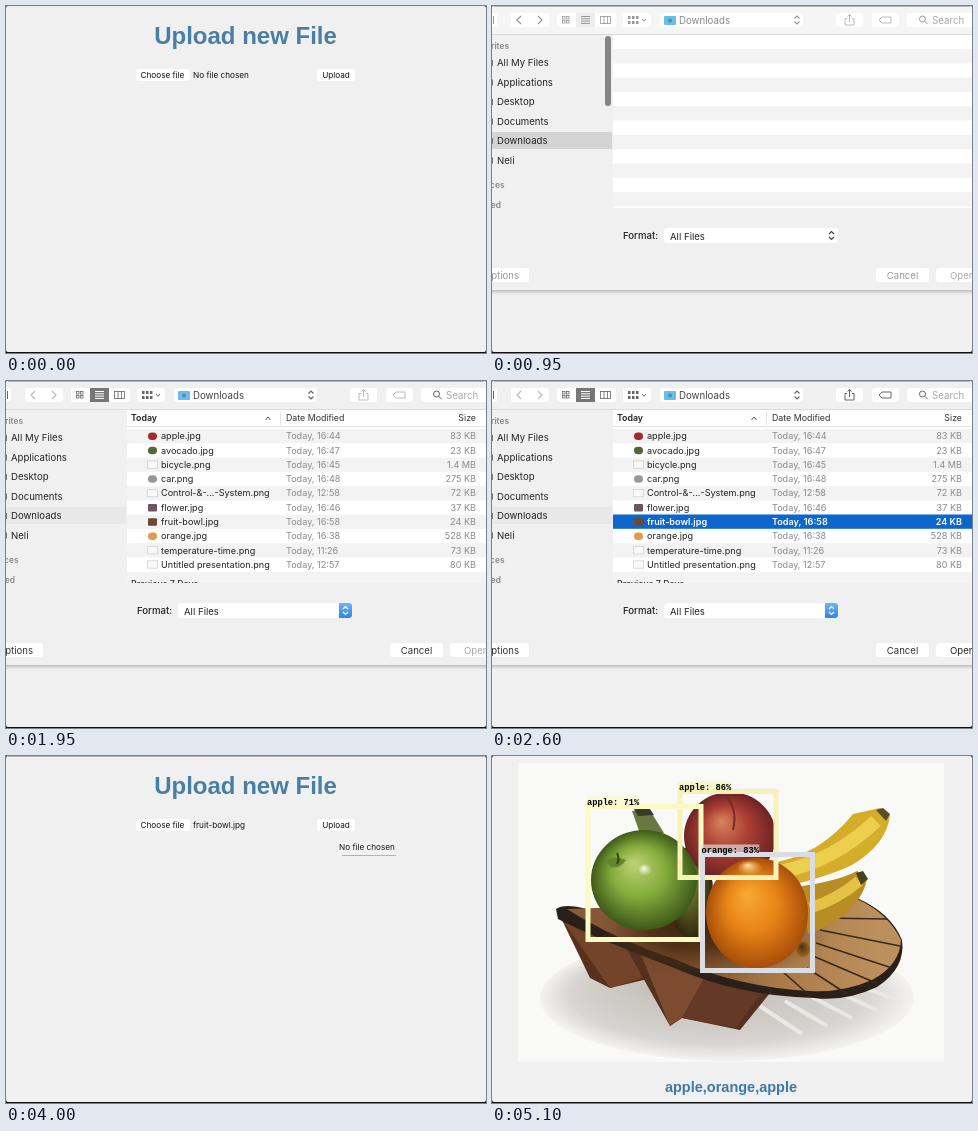
An HTML page with a canvas for the animation above (5.15 s loop, 480x347 px).

```html
<!DOCTYPE html>
<html lang="en">
<head>
<meta charset="utf-8">
<title>Upload new File</title>
<style>
html, body { margin: 0; width: 100%; height: 100%; overflow: hidden; background: #f0f0f0; }
canvas { display: block; width: 480px; height: 347px; }
</style>
</head>
<body>
<canvas id="stage" width="480" height="347"></canvas>
<script>
const LOOP = 5150;
const UI = 'Inter, sans-serif', ARIAL = '"Liberation Sans", Arial, sans-serif',
      MONO = '"Liberation Mono", monospace';
const c = document.getElementById('stage').getContext('2d');

const FILES = [
  ['apple.jpg', '16:44', '83 KB', '#a02a2e'],
  ['avocado.jpg', '16:47', '23 KB', '#55663a'],
  ['bicycle.png', '16:45', '1.4 MB', ''],
  ['car.png', '16:48', '275 KB', '#999'],
  ['Control-&-...-System.png', '12:58', '72 KB', ''],
  ['flower.jpg', '16:46', '37 KB', '#6b5560'],
  ['fruit-bowl.jpg', '16:58', '24 KB', '#6a4a35'],
  ['orange.jpg', '16:38', '528 KB', '#e39a4a'],
  ['temperature-time.png', '11:26', '73 KB', ''],
  ['Untitled presentation.png', '12:57', '80 KB', '']
];
const PLACES = ['All My Files', 'Applications', 'Desktop', 'Documents', 'Downloads', 'Neli'];

function rect(x, y, w, h, fill) {
  c.fillStyle = fill;
  c.fillRect(x, y, w, h);
}

function box(x, y, w, h, fill = '#fff', r = 2.5) {
  c.fillStyle = fill;
  c.beginPath();
  c.roundRect(x, y, w, h, r);
  c.fill();
}

// y is the vertical middle of the capitals
function text(s, x, y, size, color = '#222', { weight = 400, align = 'left', font = UI } = {}) {
  c.font = `${weight} ${size}px ${font}`;
  c.textAlign = align;
  c.fillStyle = color;
  c.fillText(s, x, y + size * 0.36);
}

function line(points, color, width = 1) {
  c.strokeStyle = color;
  c.lineWidth = width;
  c.beginPath();
  for (let i = 0; i < points.length; i += 2) c.lineTo(points[i], points[i + 1]);
  c.stroke();
}

function shape(d, fill, stroke, width = 1) {
  const p = new Path2D(d);
  if (fill) { c.fillStyle = fill; c.fill(p); }
  if (stroke) { c.strokeStyle = stroke; c.lineWidth = width; c.stroke(p); }
}

function updown(x, y, color) {
  line([x - 2.5, y - 1.5, x, y - 4, x + 2.5, y - 1.5], color, 1.2);
  line([x - 2.5, y + 1.5, x, y + 4, x + 2.5, y + 1.5], color, 1.2);
}

function gradient(g, ...colors) {
  colors.forEach((color, i) => g.addColorStop(i / (colors.length - 1), color));
  return g;
}

function ball(x, y, rx, ry, ...colors) {
  c.save();
  c.translate(x, y);
  c.scale(rx, ry);
  c.fillStyle = gradient(c.createRadialGradient(-0.2, -0.35, 0, 0, 0, 1), ...colors);
  c.beginPath();
  c.arc(0, 0, 1, 0, 7);
  c.fill();
  c.restore();
}

function drawForm(t) {
  text('Upload new File', 239.5, 29.5, 24, '#4a7fa5', { weight: 700, align: 'center', font: ARIAL });
  box(130, 63, 54, 12);
  text('Choose file', 134.5, 69.3, 8.2, '#111');
  text(t < 3000 ? 'No file chosen' : 'fruit-bowl.jpg', 187, 69.3, 8.2, '#111');
  box(311, 63, 38, 12);
  text('Upload', 330, 69.3, 8.2, '#111', { align: 'center' });
  if (t >= 4000) {
    rect(332, 86, 58, 13, '#f3f3f3');
    rect(336, 99, 54, 1, '#b4b4b4');
    text('No file chosen', 333, 91.3, 8.2, '#111');
  }
}

function drawToolbar(on, picked) {
  const ink = on ? '#666' : '#999', pale = on ? '#bbb' : '#999';
  const action = picked ? '#666' : '#bbb';
  rect(0, 0, 480, 28, on ? '#f0f0f0' : '#f5f5f5');
  rect(0, 28, 480, 1, '#dadada');
  [[-10, 15], [19, 38], [65, 59], [131, 28], [168, 143], [344, 27], [380, 27], [415, 80]]
    .forEach(([x, w]) => box(x, 7, w, 14));
  line([1.5, 10, 1.5, 18], ink);
  line([29, 10, 25, 14, 29, 18], pale, 1.2);
  line([46, 10, 50, 14, 46, 18], pale, 1.2);
  rect(84, 7, 19, 14, on ? '#777' : '#ededed');
  for (let i = 0; i < 4; i++) {
    c.strokeStyle = ink;
    c.lineWidth = 0.8;
    c.strokeRect(70.5 + i % 2 * 4, 10.5 + (i >> 1) * 4, 2.5, 2.5);
    rect(89, 10 + i * 2.3, 9, 1, on ? '#fff' : ink);
  }
  c.strokeRect(108.5, 10.5, 10, 7);
  line([112, 10, 112, 18], ink, 0.8);
  line([115.5, 10, 115.5, 18], ink, 0.8);
  for (let i = 0; i < 6; i++) rect(136 + i % 3 * 4, 10 + (i / 3 | 0) * 5, 2.5, 3, ink);
  line([150, 13, 152, 15.5, 154, 13], ink);
  box(172, 10, 12, 9, '#6bbde6', 1);
  box(176, 12.5, 4, 4, '#3b91c2', 2);
  text('Downloads', 187, 14.3, 9.7, on ? '#444' : '#888');
  updown(305, 14, ink);
  shape('M355 12.5h-2v6.5h9v-6.5h-2M357.5 16V8.5M355.5 10.5l2-2 2 2', null, action);
  shape('M390 11h9v6h-9l-3-3z', null, action);
  shape('M433.5 13a3 3 0 1 1-6 0 3 3 0 1 1 6 0M432.7 15.2l3 3', null, ink);
  text('Search', 440, 14.3, 9.7, '#aaa');
}

function drawSidebar(on) {
  const head = { weight: 600, align: 'right' };
  rect(0, 126, 120, 17, on ? '#e8e8e8' : '#d4d4d4');
  text('Favorites', 17, 40, 8.4, '#888', head);
  PLACES.forEach((name, i) => {
    const y = 57 + i * 19.5;
    text(name, 5, y, 9.6);
    rect(0, y - 3, 1, 6, '#777');
  });
  text('Devices', 12.5, 178.5, 8.4, '#888', head);
  text('Shared', 9, 199, 8.4, '#888', head);
  if (!on) box(113, 30, 6, 70, '#858585', 3);
}

function drawFiles(on, picked) {
  const pitch = 14.28, top = on ? 48 : 43.2;
  c.save();
  c.beginPath();
  c.rect(121, 29, 359, 173);
  c.clip();
  rect(121, 29, 359, 173, '#fff');
  for (let i = 0; i < 12; i += 2) rect(121, top + i * pitch, 359, pitch, '#f3f3f3');
  if (on) {
    text('Today', 125, 37.3, 8.8, '#222', { weight: 600 });
    line([259.5, 39, 262, 36, 264.5, 39], '#555');
    rect(274, 31, 1, 13, '#e4e4e4');
    text('Date Modified', 280, 37.3, 8.8, '#333');
    text('Size', 470, 37.3, 8.8, '#333', { align: 'right' });
    rect(121, 45, 359, 1, '#e6e6e6');
    FILES.forEach(([name, time, size, dot], i) => {
      const y = 55 + i * pitch, hit = i === 6 && picked;
      const weight = hit ? 600 : 400, gray = hit ? '#fff' : '#8a8a8a';
      if (hit) rect(121, y - 7.2, 359, pitch, '#0c66cc');
      if (dot) box(142, y - 3.5, 9, 7.5, dot, i === 5 || i === 6 ? 1 : 4);
      else {
        rect(141, y - 4, 11, 8, '#ccc');
        rect(141.7, y - 3.3, 9.6, 6.6, '#fafafa');
      }
      text(name, 155, y, 9.1, hit ? '#fff' : '#222', { weight });
      text('Today, ' + time, 280, y, 9.1, gray, { weight });
      text(size, 470, y, 9.1, gray, { weight, align: 'right' });
    });
    text('Previous 7 Days', 125, 202.5, 8.8, '#333', { weight: 500 });
  }
  c.restore();
}

function drawDialog(t) {
  const on = t >= 1150, picked = t >= 2050;
  c.fillStyle = gradient(c.createLinearGradient(0, 284, 0, 290), '#bdbdbd', '#e2e2e2', '#f0f0f000');
  c.fillRect(0, 284, 480, 6);
  rect(0, 0, 480, 284, '#f0f0f0');
  drawToolbar(on, picked);
  drawSidebar(on);
  drawFiles(on, picked);
  text('Format:', 131, 230, 9.6, '#222', { weight: 500 });
  box(172, 222, 174, 15);
  text('All Files', 178, 230.3, 9.6);
  if (on) {
    c.fillStyle = gradient(c.createLinearGradient(0, 222, 0, 237), '#6fb3f2', '#2f86e6');
    c.beginPath();
    c.roundRect(333, 222, 13, 15, [0, 3, 3, 0]);
    c.fill();
  }
  updown(339.5, 229.5, on ? '#fff' : '#444');
  const cancel = on ? '#333' : '#999';
  box(-20, 262, 57, 14);
  text('Options', 27, 269.3, 9.6, cancel, { align: 'right' });
  box(384, 262, 53, 14);
  text('Cancel', 410.5, 269.3, 9.6, cancel, { align: 'center' });
  box(444, 262, 60, 14);
  text('Open', 458, 269.3, 9.6, picked ? '#222' : '#aaa');
}

function tag(label, x, y, w, h, color) {
  c.strokeStyle = color;
  c.lineWidth = 5;
  c.strokeRect(x, y, w, h);
  rect(x - 2, y - 10, label.length * 5.25 + 1, 9, color + 'b0');
  text(label, x - 1, y - 5, 8.7, '#000', { weight: 700, font: MONO });
}

function drawPhoto() {
  rect(26, 7, 426, 299, '#f9f9f7');
  c.save();
  c.beginPath();
  c.rect(26, 7, 426, 299);
  c.clip();

  // cast shadow with streaks of light
  ball(235, 242, 187, 63, '#b9b2ab', '#c3bdb7', '#cac5c0', '#d0ccc8', '#d8d5d2', '#f4f3f1');
  for (let i = 0; i < 5; i++)
    line([268 + i * 25, 250 - i * 5, 310 + i * 25, 278 - i * 8], '#ebe8e4', 4);

  // stand
  shape('M70 164L148 190 160 222 118 232 98 222z', '#58301c');
  shape('M72 166L140 190 150 222 118 232z', '#74442a');
  shape('M132 188L278 237 248 274 190 262 178 270z', '#54301f');
  shape('M148 196L214 219 190 262 178 270z', '#7d4b2f');
  shape('M214 219L270 236 244 272 190 262z', '#643a26');

  // board
  shape('M64 153Q72 147 95 153L365 142Q399 157 410 184 414 212 385 231 353 246 322 242 245 240 180 211 105 183 66 163z', '#2b2019');
  c.fillStyle = gradient(c.createLinearGradient(75, 0, 390, 0), '#8a5e3c', '#76492b', '#a97a48', '#bc905c');
  c.fill(new Path2D('M75 153L365 143Q396 157 409 184 408 209 380 224 350 237 318 235 245 231 185 204 120 182 75 153z'));
  ball(225, 180, 115, 42, '#38210f', '#45290fc0', '#6b432000');
  [[330, 162, 395, 163], [328, 174, 408, 190], [324, 187, 400, 212],
   [321, 200, 384, 227], [315, 212, 355, 238], [290, 215, 318, 240]]
    .forEach(p => line(p, '#38281c', 1.6));

  // bananas
  shape('M280 107Q328 99 361 58L388 52 398 59Q395 88 360 109 328 124 280 133z', '#d4ad2b');
  shape('M288 116Q342 105 384 65', null, '#edcf4f', 14);
  shape('M384 54L391 52 398 58 394 65z', '#57502a');
  shape('M310 130Q346 125 365 115L375 122Q372 145 343 166L316 178z', '#b98d25');
  shape('M318 152Q346 143 367 125', null, '#e6c244', 11);
  shape('M364 117L371 115 376 123 369 129z', '#46411f');
  shape('M140 55L157 53 172 77 150 83z', '#697840');
  shape('M142 53L158 53 162 59 146 60z', '#343d27');

  // fruit
  ball(199, 136, 22, 46, '#a5a33c', '#5a5c22', '#30290f');
  ball(238, 80, 46, 44, '#d8845c', '#ab3f33', '#6c2224');
  shape('M234 40Q246 54 241 74', null, '#7c2b2d', 2);
  ball(152, 124, 53, 50, '#bcd377', '#86ac3c', '#3d5a1a');
  shape('M112 104Q123 99 134 104 128 113 119 111z', '#648629');
  shape('M125 108Q128 103 125 97', null, '#3c3b20', 2);
  ball(153, 114, 7, 6, '#ffffffe0', '#ffffff00');
  ball(265, 157, 51, 55, '#f8ab35', '#e88416', '#a84e0a');
  ball(258, 112, 13, 8, '#ffe7b8', '#ffc05000');
  ball(311, 193, 7, 8, '#3f3417', '#a36215');
  c.restore();

  tag('apple: 86%', 188, 35.5, 96, 86, '#f5f2b8');
  tag('apple: 71%', 96, 50.5, 113, 133, '#fafbc4');
  tag('orange: 83%', 210.5, 98.5, 110, 116, '#dcdde2');
  text('apple,orange,apple', 239, 331, 14.5, '#3f78a5', { weight: 700, align: 'center', font: ARIAL });
}

// 0 = sheet hidden above the window, 1 = fully lowered
function sheetPosition(t) {
  if (t < 550 || t >= 3250) return 0;
  if (t < 850) return 1 - (1 - (t - 500) / 350) ** 2;
  return t < 2900 ? 1 : 1 - ((t - 2900) / 350) ** 1.64;
}

function draw(t) {
  rect(0, 0, 480, 347, '#111');
  box(0, 0, 480, 346, '#f0f0f0', 2);
  if (t >= 4350) return drawPhoto();
  drawForm(t);
  const shown = sheetPosition(t);
  if (shown) {
    c.save();
    c.beginPath();
    c.roundRect(0, 0, 480, 346, 2);
    c.clip();
    c.translate(0, Math.round((shown - 1) * 285));
    drawDialog(t);
    c.restore();
  }
  if (t >= 550) rect(2, 0, 476, 1, '#b5b5b5');
}

const start = performance.now();
function tick() {
  const t = (performance.now() - start) % LOOP;
  draw(Math.floor(t / 50) * 50);
  requestAnimationFrame(tick);
}
tick();
</script>
</body>
</html>
```
